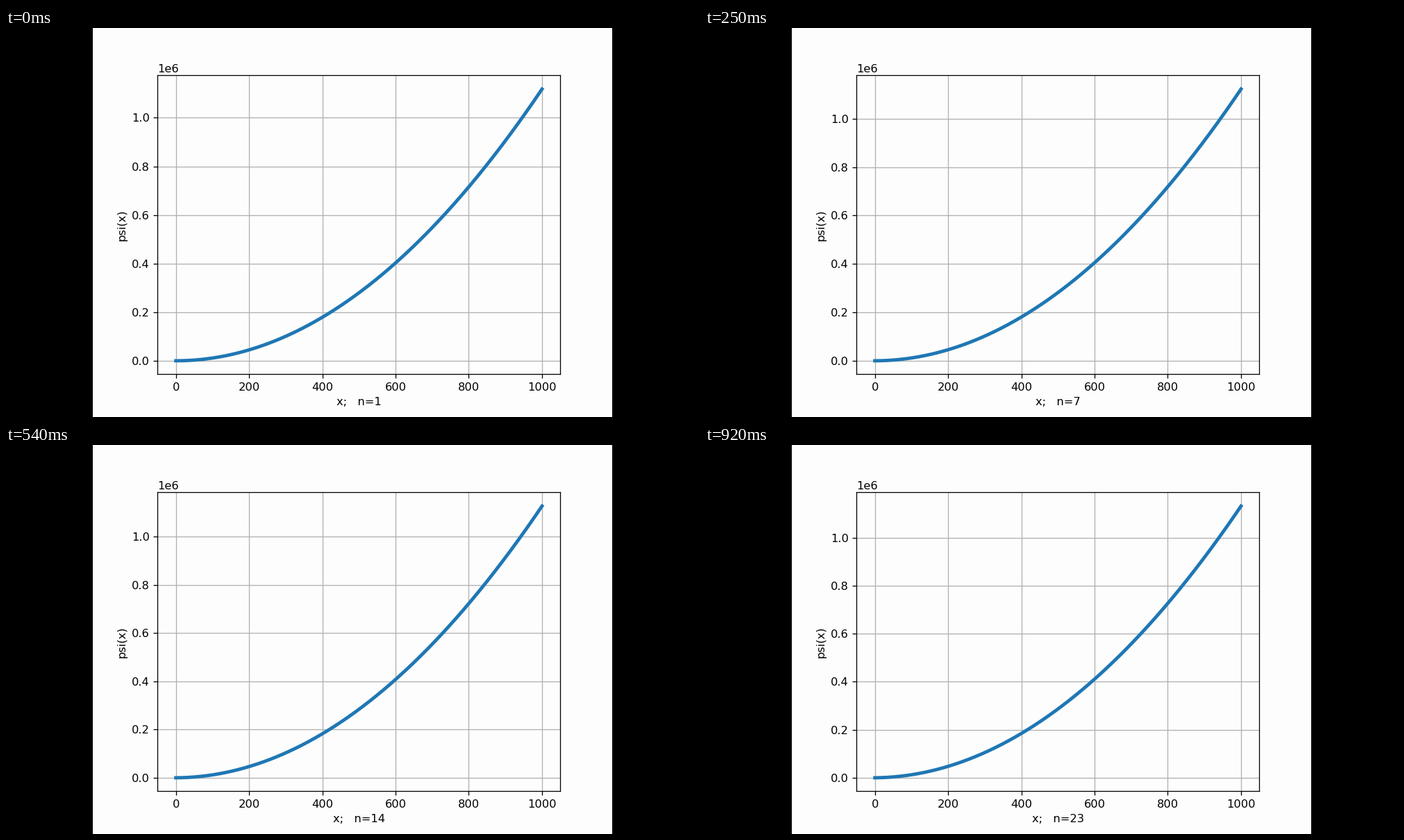
A matplotlib script that plays this animation: 998x561 px, repeating every 0.97 s.

```python
import numpy as np
import matplotlib.pyplot as plt
from matplotlib.animation import FuncAnimation
from matplotlib.patches import Rectangle

W, H = 998, 561
DPI = H / 4.8              # a 6.4 x 4.8 inch plot fills the height
BAR = 125                  # width of the black side bars
TICK_MS, LOOP_MS = 10, 970
FPS, STEPS = 24, 23

# Start of each step, rounded to whole ticks.
STARTS = np.floor(np.arange(STEPS) * 1000 / FPS / TICK_MS + 0.5)

x = np.linspace(0, 1000, 1001)


def psi(n):
    return 1.1174 * x**2 + 0.64 * n * x


fig = plt.figure(figsize=((W + 1e-9) / DPI, (H + 1e-9) / DPI), dpi=DPI,
                 facecolor="#fdfdfd")
for left in (0, W - BAR):
    fig.add_artist(Rectangle((left / W, 0), BAR / W, 1, color="black", lw=0,
                             transform=fig.transFigure))

ax = fig.add_axes([218.3 / W, 1 - 499.5 / H, 580 / W, 431 / H],
                  facecolor="#fdfdfd")
ax.grid(True)
ax.set_xlim(-50, 1050)
ax.set_yticks(np.arange(6) * 2e5)
ax.set_ylabel("psi(x)")
line, = ax.plot(x, psi(1), color="#1f77b4", lw=3)


def update(tick):
    n = int(np.sum(STARTS <= tick))
    y = psi(n)
    line.set_ydata(y)
    ax.set_ylim(-0.05 * y[-1], 1.05 * y[-1])
    ax.set_xlabel(f"x;   n={n}")
    return line,


anim = FuncAnimation(fig, update, frames=LOOP_MS // TICK_MS,
                     init_func=lambda: update(0), interval=TICK_MS,
                     repeat=True, repeat_delay=0, blit=False)
plt.show()
```
